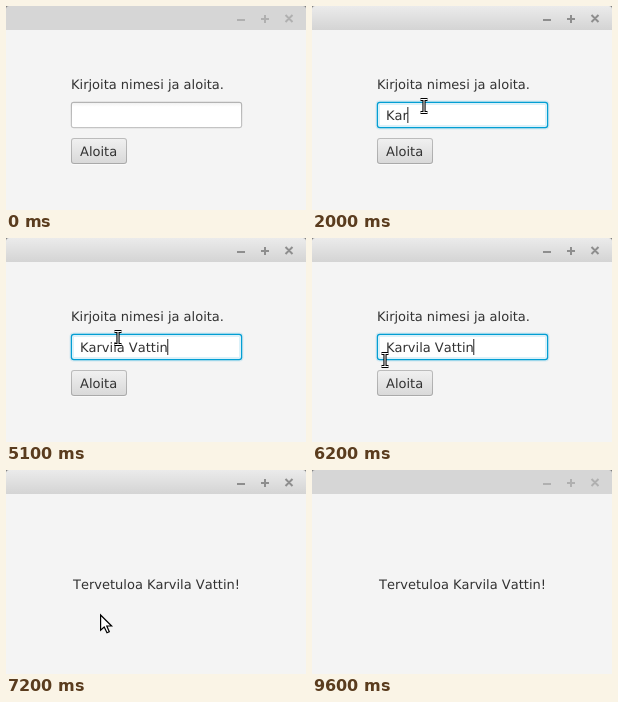
Recreate the animation shown at these times as an HTML page. Size 300 by 204 pixels, loop 9.8 s.

```html
<!DOCTYPE html>
<html lang="fi">
<head>
<meta charset="utf-8">
<title>Aloita</title>
<style>
  html, body { margin: 0; width: 100%; height: 100%; overflow: hidden; background: #f4f4f4; }
  svg { display: block; width: 100%; height: 100%; }
  text {
    font: 13px "DejaVu Sans", sans-serif;
    font-kerning: none;
    text-rendering: geometricPrecision;
    fill: #323232;
    white-space: pre;
  }
  .hidden { display: none; }

  .bar { fill: #d6d6d6; }
  .icons { fill: none; stroke: #b0b0b0; stroke-width: 2; }
  .active .bar { fill: url(#barLight); }
  .active .icons { stroke: #8e8e8e; }

  .frame { fill: url(#fieldEdge); }
  .halo { fill: none; }
  #button .frame { fill: url(#buttonEdge); }
  .focused .frame, #button.focused .frame { fill: #039ed3; }
  .focused .halo { fill: #039ed3; fill-opacity: .14; }
  .fill { fill: url(#fieldFill); }
  .focused .fill { fill: none; }
  .core { fill: none; }
  .focused .core { fill: #fff; }

  .face { fill: url(#face); }
  .hover .face { fill: url(#faceHover); }
  .pressed .face { fill: url(#facePressed); }

  .arrow { fill: #fff; stroke: #000; stroke-width: 1.2; }
  .beam path { fill: none; stroke: #000; stroke-width: 3.2; }
  .beam path + path { stroke: #fff; stroke-width: 1; }
</style>
</head>
<body>
<svg id="stage" viewBox="0 0 300 204">
  <defs>
    <linearGradient id="barLight" x2="0" y2="1">
      <stop stop-color="#ebebeb"/><stop offset="1" stop-color="#d4d4d4"/>
    </linearGradient>
    <linearGradient id="fieldEdge" x2="0" y2="1">
      <stop stop-color="#b3b3b3"/><stop offset="1" stop-color="#c4c4c4"/>
    </linearGradient>
    <linearGradient id="fieldFill" x2="0" y2="1">
      <stop stop-color="#f2f2f2"/><stop offset=".16" stop-color="#fff"/>
    </linearGradient>
    <linearGradient id="buttonEdge" x2="0" y2="1">
      <stop stop-color="#bcbcbc"/><stop offset="1" stop-color="#a9a9a9"/>
    </linearGradient>
    <linearGradient id="face" x2="0" y2="1">
      <stop stop-color="#f0f0f0"/><stop offset="1" stop-color="#d9d9d9"/>
    </linearGradient>
    <linearGradient id="faceHover" x2="0" y2="1">
      <stop stop-color="#f8f8f8"/><stop offset="1" stop-color="#e2e2e2"/>
    </linearGradient>
    <linearGradient id="facePressed" x2="0" y2="1">
      <stop stop-color="#dcdcdc"/><stop offset="1" stop-color="#c9c9c9"/>
    </linearGradient>
  </defs>

  <rect width="300" height="24" fill="#777"/>
  <path class="bar" d="M0 24V3Q0 0 3 0H297Q300 0 300 3V24Z"/>
  <path class="icons" d="M231 14h8M255 13h8m-4-4v8M279.5 9l7 7m0-7l-7 7"/>
  <rect y="24" width="300" height="180" fill="#f4f4f4"/>

  <g id="form">
    <text x="65" y="83">Kirjoita nimesi ja aloita.</text>
    <g id="field">
      <rect class="frame" x="64.8" y="95.8" width="171.4" height="26.4" rx="3"/>
      <rect x="66" y="97" width="169" height="24" rx="2" fill="#fff"/>
      <rect class="fill" x="66" y="97" width="169" height="24" rx="2"/>
      <rect class="halo" x="63.6" y="94.6" width="173.8" height="28.8" rx="4"/>
      <rect class="core" x="68" y="99" width="165" height="20"/>
      <text id="typed" x="74" y="114"></text>
      <rect id="caret" y="101" width="1" height="16" fill="#222"/>
    </g>
    <g id="button">
      <rect class="halo" x="63.6" y="130.6" width="58.8" height="28.8" rx="4"/>
      <rect x="65" y="133" width="56" height="26" rx="3" fill="#fff" opacity=".6"/>
      <rect class="frame" x="65" y="132" width="56" height="26" rx="3"/>
      <rect class="face" x="66" y="133" width="54" height="24" rx="2"/>
      <text x="74" y="150">Aloita</text>
    </g>
  </g>
  <text id="welcome" x="67" y="119"></text>

  <g id="pointer">
    <path class="arrow" d="M.6 1V16.2L4.2 13L7 18.8L9.3 17.8L6.8 12H11.6Z"/>
    <g class="beam">
      <path d="M-3.5 -6.5H3.5M-3.5 6.5H3.5M0 -6.5V6.5"/>
      <path d="M-3.5 -6.5H3.5M-3.5 6.5H3.5M0 -6.5V6.5"/>
    </g>
  </g>
</svg>
<script>
  const LOOP = 9800, STEP = 100;
  const FOCUS = 700, PRESS = 7100, GREET = 7200, LEAVE = 9100, BLUR = 9600;
  const NAME = 'Karvila Vattin';

  // Each entry: time and the field's content from then on.
  const first = n => NAME.slice(0, n);
  const slip = first(9) + 'A';
  const typing = [
    [FOCUS, ''], [1600, first(1)], [1900, first(2)], [2000, first(3)],
    [2200, first(4)], [2500, first(5)], [2700, first(7)], [2900, first(8)],
    [3100, first(9)], [3200, slip], [3400, slip + 't'], [3500, slip + 'tt'],
    [3900, slip + 't'], [4000, slip], [4100, first(9)],
    [4300, first(10)], [4400, first(11)], [4600, first(12)],
    [4900, first(13)], [5100, NAME]
  ];

  // Pointer path: time, x, y.
  const path = [
    [100, 128, 182], [300, 120, 144], [500, 108, 106], [700, 105, 97], [900, 112, 100],
    [5900, 112, 100], [6100, 92, 112], [6300, 54, 132], [6400, 51, 138], [6700, 94, 144],
    [8200, 94, 144], [8400, 108, 150], [8700, 180, 100], [9000, 262, 8], [9100, 262, -20]
  ];

  const $ = id => document.getElementById(id);
  const [stage, form, field, button, typed, caret, welcome, pointer] =
    ['stage', 'form', 'field', 'button', 'typed', 'caret', 'welcome', 'pointer'].map($);
  const arrow = pointer.querySelector('.arrow');
  const beam = pointer.querySelector('.beam');
  const show = (el, on) => el.classList.toggle('hidden', !on);
  const inside = ([x, y], left, top, right, bottom) =>
    x >= left && x <= right && y >= top && y <= bottom;

  welcome.textContent = `Tervetuloa ${NAME}!`;

  function pointerAt(t) {
    const i = Math.max(1, path.findIndex(p => p[0] >= t));
    const [t0, x0, y0] = path[i - 1], [t1, x1, y1] = path[i];
    const k = (t - t0) / (t1 - t0);
    return [Math.round(x0 + (x1 - x0) * k), Math.round(y0 + (y1 - y0) * k)];
  }

  function draw(now) {
    const t = Math.floor(now % LOOP / STEP) * STEP;
    const inForm = t < GREET;
    const fieldFocused = t >= FOCUS && t < PRESS;
    const pressed = t >= PRESS && inForm;

    stage.classList.toggle('active', t >= FOCUS && t < BLUR);
    show(form, inForm);
    show(welcome, !inForm);

    const [keyTime, content] = typing.filter(k => k[0] <= t).pop() || typing[0];
    if (typed.textContent !== content) typed.textContent = content;
    field.classList.toggle('focused', fieldFocused);
    show(caret, fieldFocused && (t - keyTime) % 1000 < 500);
    if (inForm) caret.setAttribute('x', 73.5 + (content ? typed.getComputedTextLength() : 0));

    const visible = t >= path[0][0] && t < LEAVE;
    show(pointer, visible);
    const spot = visible ? pointerAt(t) : [-50, -50];
    const overField = inForm && inside(spot, 65, 96, 236, 122);
    pointer.setAttribute('transform', `translate(${spot})`);
    show(beam, overField);
    show(arrow, !overField);

    button.classList.toggle('hover', inside(spot, 65, 132, 121, 158));
    button.classList.toggle('pressed', pressed);
    button.classList.toggle('focused', pressed);
  }

  const start = performance.now();
  function tick() {
    draw(performance.now() - start);
    requestAnimationFrame(tick);
  }
  tick();
</script>
</body>
</html>
```
